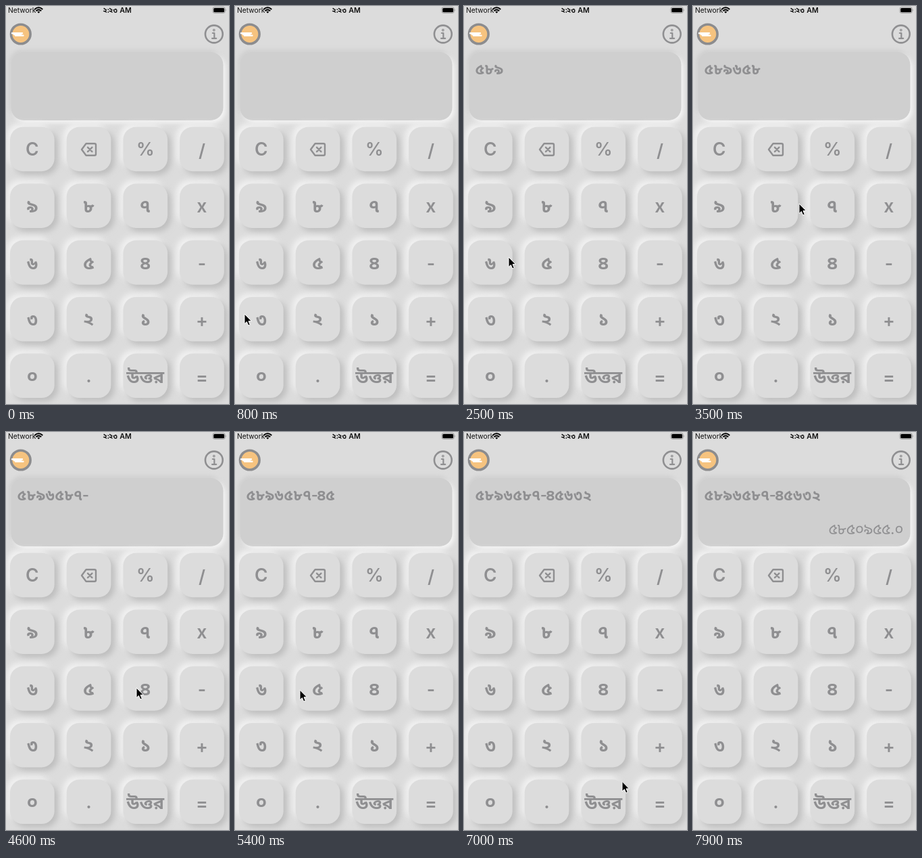
Write an HTML page that moves like this. It is 330 px wide and 588 px high and loops after 8000 ms.

```html
<!DOCTYPE html>
<html lang="bn">
<head>
<meta charset="utf-8">
<title>Calculator</title>
<style>
html, body { margin: 0; width: 100%; height: 100%; overflow: hidden; background: #dcdcdc; }
svg { display: block; width: 100vw; height: 100vh; }
text { font-family: Inter, "Noto Sans Bengali", "Noto Sans", sans-serif; }
.ink { fill: #8f8f91; }
.line { fill: none; stroke: #8f8f91; stroke-linecap: round; stroke-linejoin: round; }
</style>
</head>
<body>
<svg id="stage" viewBox="0 0 330 588">
  <defs>
    <filter id="soft" x="-30%" y="-30%" width="160%" height="160%"><feGaussianBlur stdDeviation="4.5"/></filter>
    <filter id="edge" x="-10%" y="-20%" width="120%" height="140%"><feGaussianBlur stdDeviation="3"/></filter>
  </defs>
  <rect width="330" height="588" fill="#dcdcdc"/>
  <rect x="5" y="65" width="314" height="101" rx="19" fill="#cdcdcd" filter="url(#edge)"/>
  <rect x="11" y="72" width="314" height="101" rx="19" fill="#f4f4f4" filter="url(#edge)"/>
  <rect x="7.5" y="68" width="314" height="101" rx="19" fill="#cfcfcf"/>
  <g id="status"></g>
  <g>
    <circle cx="21.8" cy="41.5" r="14.3" fill="#f6c37f" stroke="#8c8c8e" stroke-width="3.6"/>
    <path d="M9 40.3H24M14 43.6H25.5M12 42H22" fill="none" stroke="#fff" stroke-width="2.4" stroke-linecap="round"/>
  </g>
  <g class="line" stroke-width="2.6">
    <circle cx="307.8" cy="41.5" r="12.9"/>
    <path d="M305.8 40H308.3V47.6M305 47.8H311.2" stroke-width="2.2"/>
    <circle cx="307.8" cy="35.6" r=".6"/>
  </g>
  <g id="shadows"></g>
  <g id="keys"></g>
  <g id="display"></g>
  <path id="cursor" d="M0 0V14.6L3.4 11.5L5.7 17L8.3 15.9L6 10.6H10.4Z" fill="#000" stroke="#fff" stroke-width="1"/>
</svg>
<script>
const $ = id => document.getElementById(id);
const LOOP = 8000, STEP = 100;

// Stroked numerals for systems without a Bengali font.
const numerals = {
  '০': 'M9 4.5a6 6.3 0 1 0 .1 0z',
  '১': 'M5 3Q15 4 14.5 11Q14 17 8 17Q4 16 5 12Q9 10 10 14',
  '২': 'M5 4Q12 0 13 5Q13 9 4 12Q9 11 14 18',
  '৩': 'M9 10Q5 5 3 10Q2 17 8 17Q16 17 16 10Q16 4 12 5Q9 8 13 10',
  '৪': 'M9 10Q2 6 5 3Q9 0 13 3Q16 6 9 10Q3 13 5 16Q9 19 13 16Q15 13 9 10z',
  '৫': 'M11 3Q2 4 2 11Q3 17 9 17Q15 17 15 12Q13 9 9 11Q15 6 11 3',
  '৬': 'M3 4Q9 3 8 9Q4 9 3 13Q4 17 9 17Q15 16 15 10H9',
  '৭': 'M13 18V7Q12 2 7 3Q2 5 3 9Q6 13 9 9Q8 6 5 7',
  '৮': 'M1 4H6V14Q7 18 12 16Q16 13 12 9H6Q12 11 17 6',
  '৯': 'M2 5Q9 9 4 13Q10 4 15 9Q16 16 8 17Q5 17 3 14',
  'উত্তর': 'M-18 4H36M-12 5Q0 2-2 10Q-9 9-8 12Q-2 13-4 18Q-12 20-15 13M-16 4Q-13-6-2-1M10 10Q3 10 4 16Q10 23 17 15Q17 5 6 7M22 5L34 14V4M34 14L22 11L34 5M28 18v1'
};
const pen = document.createElement('canvas').getContext('2d');
pen.font = '100px "Noto Sans Bengali", "Noto Sans", sans-serif';
const widthOf = s => pen.measureText(s).width;
const hasBengali = [...'০১৪৫৮'].some(c => widthOf(c) !== widthOf('\u0984'));

function label(s, x, y, size, weight = 600, color = '#8f8f91') {
  if (numerals[s] && !hasBengali) {
    const k = size / 27;
    return `<path d="${numerals[s]}" fill="none" stroke="${color}" stroke-width="${weight / 220}"
      transform="translate(${x - 9 * k} ${y - 18 * k}) scale(${k})"/>`;
  }
  return `<text x="${x}" y="${y}" font-size="${size}" font-weight="${weight}" fill="${color}" text-anchor="middle">${s}</text>`;
}

// Sets a number one character after another; each sits in the middle of its cell.
function number(s, x, y, size, weight, advance) {
  if (hasBengali) {
    const xs = [...s].map(c => { const w = advance(c), mid = x + w / 2; x += w; return mid.toFixed(1); });
    return `<text x="${xs.join(' ')}" y="${y}" font-size="${size}" font-weight="${weight}" class="ink" text-anchor="middle">${s}</text>`;
  }
  return [...s].map(c => { const w = advance(c); x += w; return label(c, x - w / 2, y, size, weight); }).join('');
}

// Status bar
$('status').innerHTML = `
  <text x="3" y="10" font-size="10.3" fill="#111">Network</text>
  <g fill="none" stroke="#000" stroke-width="1.9">
    <path d="M42.3 5Q48.3-.6 54.3 5M44.4 7.3Q48.3 3.7 52.2 7.3"/>
    <path d="M46.3 8.6Q48.3 6.9 50.3 8.6L48.3 10.7Z" fill="#000" stroke="none"/>
  </g>` +
  ['২', ':', '২', '৩'].map((c, i) => label(c, [146.5, 151.2, 155.2, 161.6][i], 10, 10.8, 700, '#111')).join('') +
  `<text x="168.3" y="10" font-size="10.6" font-weight="600" fill="#111">AM</text>
  <rect x="306" y="1.8" width="18.3" height="8.6" rx="2.5" fill="none" stroke="#888" stroke-width=".8"/>
  <rect x="307.2" y="3" width="15.9" height="6.2" rx="1.5"/>
  <path d="M325.4 4.6q1.3 1.5 0 3z" fill="#888"/>`;

// Keypad
const rows = [['C', '⌫', '%', '/'], ['৯', '৮', '৭', 'x'], ['৬', '৫', '৪', '-'], ['৩', '২', '১', '+'], ['০', '.', 'উত্তর', '=']];
const eraser = `<g class="line" stroke-width="2.4">
  <path d="M118.5 203.3H131Q133 203.3 133 205.3V218.7Q133 220.7 131 220.7H118.5L112 212Z"/>
  <path d="M121 208.8L127.4 215.2M127.4 208.8L121 215.2"/></g>`;
const shadowOf = {};
let shadows = '', faces = '';
rows.forEach((row, r) => row.forEach((name, c) => {
  const x = 6 + 83.7 * c, y = 178.8 + 83.7 * r, cx = x + 32.8;
  const box = (dx, dy, rest) => `<rect x="${x + dx}" y="${y + dy}" width="65.7" height="65.5" rx="19" ${rest}/>`;
  shadows += `<g data-key="${name}">${box(-5, -5, 'fill="#f2f2f2" filter="url(#soft)"')}${box(5, 5, 'fill="#bebebe" filter="url(#soft)"')}</g>`;
  faces += box(0, 0, 'fill="#dcdcdc"');
  if (name === '⌫') faces += eraser;
  else {
    const word = name.length > 1, latin = 'C%/x-+=.'.includes(name);
    faces += label(name, cx, y + (word ? 43 : '-+=/'.includes(name) ? 44 : 42.3), word ? 26 : latin ? 26.5 : 27, 600);
  }
}));
$('shadows').innerHTML = shadows;
$('keys').innerHTML = faces;
document.querySelectorAll('[data-key]').forEach(g => shadowOf[g.dataset.key] = g);

// Typing times follow the characters of the sum.
const sum = '৫৮৯৬৫৮৭-৪৫৬৩২';
const typed = [1300, 1800, 2300, 2600, 2900, 3400, 3700, 4300, 4700, 5000, 5600, 6300, 6600];
const answerAt = 7300;
const presses = [['৫', 1300], ['৮', 1800], ['৫', 2900], ['৫', 5000], ['২', 6400]];

// Pointer stops: time, x, y
const path = [
  [400, 313, 41], [600, 190, 270], [800, 14, 455], [1000, 106, 398], [1100, 118, 380], [1300, 118, 380],
  [1400, 124, 294], [2000, 122, 294], [2200, 80, 295], [2300, 36, 294], [2400, 38, 365], [2500, 66, 371],
  [2700, 116, 378], [3000, 116, 378], [3200, 122, 294], [3400, 124, 293], [3500, 157, 292], [3600, 203, 292],
  [3900, 268, 367], [4300, 271, 370], [4600, 193, 378], [4900, 120, 382], [5200, 118, 382], [5700, 63, 380],
  [5900, 36, 382], [6100, 42, 464], [6200, 59, 469], [6400, 117, 470], [6600, 121, 473], [6900, 205, 510],
  [7200, 292, 529], [7600, 300, 529], [7800, 266, 371], [7900, 266, 371]
];

function pointer(t) {
  const i = path.findIndex(p => p[0] > t);
  if (i < 1) return null;
  const [t0, x0, y0] = path[i - 1], [t1, x1, y1] = path[i], k = (t - t0) / (t1 - t0);
  return [x0 + (x1 - x0) * k, y0 + (y1 - y0) * k];
}

let shown = '';
function draw(time) {
  const t = Math.floor(time % LOOP / STEP) * STEP;

  const count = typed.filter(at => at <= t).length, solved = t >= answerAt;
  if (shown !== count + '|' + solved) {
    shown = count + '|' + solved;
    $('display').innerHTML =
      number(sum.slice(0, count), 16.5, 101, 22, 600, c => c === '-' ? 8 : c === '৪' ? 12 : 13.9) +
      (solved ? number('৫৮৫০৯৫৫.০', 200.5, 151, 22.5, 400, c => c === '.' ? 6 : 13.1) : '');
  }

  for (const key in shadowOf) {
    const flat = Math.max(0, ...presses.map(([k, at]) => k === key && t >= at ? Math.min(1, 1 - (t - at - 200) / 200) : 0));
    shadowOf[key].style.opacity = 1 - flat;
  }

  const at = pointer(t);
  $('cursor').style.display = at ? '' : 'none';
  if (at) $('cursor').setAttribute('transform', `translate(${at[0]} ${at[1]})`);
}

const start = performance.now();
function tick() {
  draw(performance.now() - start);
  requestAnimationFrame(tick);
}
tick();
</script>
</body>
</html>
```
